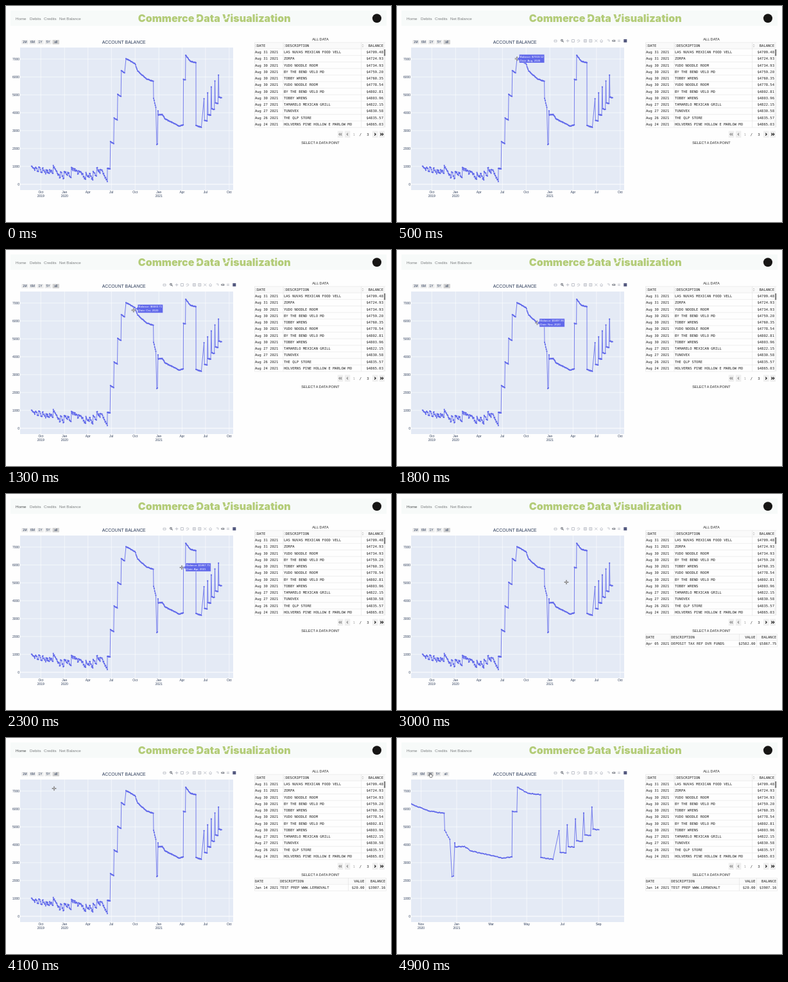
An HTML page for the animation above (5 s loop, 600x338 px).

```html
<!DOCTYPE html>
<html lang="en">
<head>
<meta charset="utf-8">
<title>Commerce Data Visualization</title>
<style>
html, body { margin: 0; width: 100%; height: 100%; overflow: hidden; background: #fefefe; }
svg { display: block; width: 100%; height: 100%; }
</style>
</head>
<body>
<svg viewBox="0 0 600 338">
  <defs><clipPath id="plot"><rect x="22" y="65" width="332" height="223"/></clipPath></defs>
  <g id="page"></g><g id="chart"></g><g id="live"></g>
</svg>
<script>
const SANS = 'Liberation Sans, Arial, sans-serif';
const MONO = 'DejaVu Sans Mono, monospace';
const INK = '#2a3a58', BLUE = '#6068ea', RULE = '#dcdcdc';
const $ = id => document.getElementById(id);

const text = (x, y, s, size, fill = '#222', anchor = 'start', font = SANS, extra = '') =>
  `<text x="${x}" y="${y}" font-size="${size}" font-family="${font}" fill="${fill}" text-anchor="${anchor}" ${extra}>${s}</text>`;
const rect = (x, y, w, h, fill, extra = '') =>
  `<rect x="${x}" y="${y}" width="${w}" height="${h}" fill="${fill}" ${extra}/>`;
const path = (d, stroke, w = 1, extra = '') =>
  `<path d="${d}" fill="none" stroke="${stroke}" stroke-width="${w}" ${extra}/>`;
const mono = (x, y, s, anchor, fill = '#222') => text(x, y, s, 5.5, fill, anchor, MONO);
const uprights = (xs, top, bottom) => path(xs.map(x => `M${x} ${top}V${bottom}`).join(''), RULE, 0.5);

// ---- axes: x in pixels of the full view, y from dollars
const NEW_YEAR = 238.2, PER_DAY = 0.4016;
const toZoom = x => 93 + (x - NEW_YEAR) * 2.266;
const dollarY = v => 279 - v * 0.028;
const day0 = Date.UTC(2021, 0, 1);
const dateX = ms => NEW_YEAR + (ms - day0) / 864e5 * PER_DAY;
const xDate = x => new Date(day0 + (x - NEW_YEAR) / PER_DAY * 864e5);
const MONTHS = 'Jan Feb Mar Apr May Jun Jul Aug Sep Oct Nov Dec'.split(' ');

// ---- balance curve: pay every two weeks, small spendings in between
const PAY = 5.65;
const rand = i => { const v = Math.sin(i * 12.9898 + 4) * 43758.5453; return v - Math.floor(v); };
const points = [];

// goes to a point; gentle slopes get a trail of small steps
function to(x, v, jitter = 40) {
  if (points.length) {
    const [px, pv] = points[points.length - 1], dx = x - px, dv = v - pv;
    const n = Math.abs(dv) < 180 * dx ? Math.round(dx / 0.8) : 0;
    for (let k = 1; k < n; k++)
      points.push([px + dx * k / n, pv + dv * k / n + (rand(points.length) - 0.5) * jitter]);
  }
  points.push([x, v]);
}

for (let i = 0; i < 21; i++) {
  const x = 39.8 + PAY * i, top = 1180 - 400 * rand(i) - 14 * i;
  to(x, top);
  to(x + PAY - 0.6, top - 180 - 180 * rand(i + 50), 170);
}
to(158, 890);
to(162.2, 860);
for (let i = 0; i < 4; i++) {
  const x = 162.8 + PAY * i, v = 2390 + 1320 * i;
  to(x, v);
  to(x + PAY - 0.6, v - 120);
}
[[187, 7019.52], [201, 6750], [205, 6340], [218.5, 5897.96], [229.6, 5760], [230, 4800], [233.5, 4300],
  [235, 2220], [236, 2250], [236.9, 4100], [237.2, 3880], [243.6, 3907.16], [248, 3650], [270, 3250],
  [276.2, 3320], [276.5, 5867.75], [279.6, 5840], [280, 7210], [287, 6880], [296, 6800], [296.1, 3290],
  [304.4, 3180]].forEach(([x, v]) => to(x, v));
for (let i = 0; i < 5; i++) {
  const x = 308.6 + PAY * i, floor = 3570 + 325 * i;
  to(x, 4780 + 330 * i);
  to(x + 0.8, floor);
  to(x + PAY - 0.9, floor - 30);
}

function chart(zoomed) {
  const place = zoomed ? toZoom : x => x;
  let s = rect(22, 65, 332, 223, '#e4eaf5');
  for (let k = 0; k < 8; k++) {
    const y = dollarY(k * 1000);
    s += path(`M22 ${y}H354`, '#fff', k ? 0.6 : 1.1) + text(21, y + 1.8, k * 1000, 5, INK, 'end');
  }
  const [start, step, count] = zoomed ? [13, 2, 6] : [0, 3, 9];
  for (let i = 0; i < count; i++) {
    const ms = Date.UTC(2019, 9 + start + i * step, 1), d = new Date(ms), x = place(dateX(ms));
    s += path(`M${x} 65V288`, '#fff', 0.6) + text(x, 293.3, MONTHS[d.getUTCMonth()], 5, INK, 'middle');
    if (!i || !d.getUTCMonth()) s += text(x, 299.2, d.getUTCFullYear(), 5, INK, 'middle');
  }
  const at = points.map(([x, v]) => `${place(x).toFixed(2)} ${dollarY(v).toFixed(2)}`);
  s += '<g clip-path="url(#plot)">' + path('M' + at.join('L'), BLUE, 0.85, 'stroke-linejoin="round"')
    + path(at.map(p => `M${p}h0`).join(''), BLUE, 2.2, 'stroke-linecap="round"') + '</g>';
  s += text(183.7, 58.7, 'ACCOUNT BALANCE', 6.9, INK, 'middle');

  ['1M', '6M', '1Y', '5Y', 'all'].forEach((label, i) => {
    const x = (zoomed ? 22.3 : 24) + i * 12.1, active = i === (zoomed ? 2 : 4);
    s += rect(x, 53, 10.6, 7, active ? '#d2d2d2' : '#eee', 'rx="1"') + text(x + 5.3, 58.2, label, 5, INK, 'middle');
  });
  return s;
}

// ---- everything that stays put
const rows = [
  ['Aug 31', 'LAS NUVAS MEXICAN FOOD VELL', '4709.48'],
  ['Aug 31', 'ZORPA', '4724.93'],
  ['Aug 30', 'YUDO NOODLE ROOM', '4734.93'],
  ['Aug 30', 'BY THE BEND VELO MO', '4759.20'],
  ['Aug 30', 'TOBBY WRENS', '4760.35'],
  ['Aug 30', 'YUDO NOODLE ROOM', '4778.54'],
  ['Aug 30', 'BY THE BEND VELO MO', '4802.81'],
  ['Aug 30', 'TOBBY WRENS', '4803.96'],
  ['Aug 27', 'TAMARELO MEXICAN GRILL', '4822.15'],
  ['Aug 27', 'TUNOVEX', '4830.58'],
  ['Aug 26', 'THE QLP STORE', '4835.57'],
  ['Aug 24', 'HOLVERNS PINE HOLLOW E MARLOW MO', '4865.03']
];

function page() {
  let s = rect(7, 7, 586, 24, '#f7faf9');
  [[37, 'Debits'], [59, 'Credits'], [83, 'Net Balance']].forEach(([x, label]) =>
    s += text(x, 21.5, label, 6.2, '#7c7f80'));
  s += text(324.7, 25.3, 'Commerce Data Visualization', 16, '#b3cc78', 'middle', 'Inter, sans-serif', 'font-weight="900"');
  s += path('M296 21L302 17M340 21L347 17', '#f7faf9', 1.5);
  s += '<circle cx="578" cy="19.3" r="7" fill="#161514"/>';

  s += text(490, 54.4, 'ALL DATA', 5.6, '#222', 'middle') + rect(387.5, 57, 204, 10, '#fafafa');
  s += mono(391, 64, 'DATE') + mono(436, 64, 'DESCRIPTION') + mono(588, 64, 'BALANCE', 'end');
  [389.5, 434.5, 556].forEach(x => s += path(`M${x - 1} 61.5l1 -1.5l1 1.5M${x - 1} 62.7l1 1.5l1 -1.5`, '#aaa', 0.6));
  rows.forEach(([date, what, sum], i) => {
    const y = 74.1 + i * 10.25;
    s += mono(388, y, date + ' 2021') + mono(433, y, what) + mono(588, y, '$' + sum, 'end')
      + path(`M387.5 ${y - 7}H589`, RULE, 0.5);
  });
  s += path('M387.5 57H591.5M387.5 190.2H589', RULE, 0.5) + uprights([387.5, 432, 553.7, 589], 57, 190)
    + rect(589, 67, 2.4, 123, '#efefef') + rect(589.2, 68, 2, 10, '#777');

  const arrow = (x, dir, color) => path(`M${x - dir} 198.9l${dir * 1.8} 1.8l${-dir * 1.8} 1.8`, color, 1.1);
  [[521, -1, 2], [532, -1, 1], [575.3, 1, 1], [585.7, 1, 2]].forEach(([x, dir, n]) => {
    s += rect(x - 4.2, 195.5, 8.5, 10.5, '#efefef');
    for (let k = 0; k < n; k++) s += arrow(x + (k - (n - 1) / 2) * 2.6, dir, dir < 0 ? '#888' : '#111');
  });
  s += mono(542.5, 202.6, '1', 'middle', '#aaa') + mono(552.5, 202.6, '/', 'middle') + mono(564, 202.6, '3', 'middle');
  return s + text(490, 216, 'SELECT A DATA POINT', 5.5, '#222', 'middle');
}

// ---- things that come and go
function picked([date, what, value, balance]) {
  const line = (y, a, b, c, d) =>
    mono(388, y, a) + mono(427.3, y, b) + mono(558.7, y, c, 'end') + mono(591.3, y, d, 'end');
  return rect(387.5, 219, 205, 10, '#fafafa') + path('M387.5 219.2h205m-205 10h205m-205 10h205', RULE, 0.5)
    + uprights([387.5, 426, 533.5, 560.5, 592.5], 219, 239)
    + line(225.9, 'DATE', 'DESCRIPTION', 'VALUE', 'BALANCE') + line(236, date, what, value, balance);
}

// toolbar icons in groups, each drawn around its own centre
const BOX = 'M-2 -2h4v4h-4z';
const icons = [
  ['M-2 -1.2h4v2.8h-4z'],
  ['M-2 -.7a1.4 1.4 0 1 0 2.8 0a1.4 1.4 0 1 0 -2.8 0M.5 .5l1.6 1.6', 'M-2.4 0h4.8M0 -2.4v4.8', BOX, 'M-2 0a2 1.5 0 1 1 2 1.5l-1.6 .8'],
  [BOX + 'M-1 0h2M0 -1v2', BOX + 'M-1 0h2', 'M-2 -2l4 4M2 -2l-4 4', 'M-2.2 .2L0 -2L2.2 .2M-1.4 0v2h2.8v-2'],
  ['M-1.5 -1.5h3v3', 'M-2 0l1 -1h3v2h-3z', 'M-2 -1h4M-2 1h4']
];
function modebar() {
  let s = rect(353.3, 52, 5, 5, '#555a80'), x = 247;
  for (const group of icons) {
    group.forEach((d, i) => {
      const strong = group.length % 2 ? i === 1 : group === icons[1] && !i;
      s += path(d, strong ? '#80848c' : '#b8bcc4', strong ? 1.2 : 0.9, `transform="translate(${x} 54.5)"`);
      x += 8.4;
    });
    x += 2.2;
  }
  return s;
}

function tip([x, value]) {
  const y = dollarY(value), d = xDate(x);
  return path(`M${x} ${y}l3.4 -2.4v-4.2h39.4v13.2h-39.4v-4.2z`, '#fff', 0.4, `style="fill:${BLUE}"`)
    + text(x + 4.8, y - 1.5, 'Balance: $' + value.toFixed(2), 4.4, '#fff')
    + text(x + 4.8, y + 4.6, `Date: ${MONTHS[d.getUTCMonth()]}, ${d.getUTCFullYear()}`, 4.4, '#fff');
}

function pointer(x, y) {
  if (y > 65) {
    const plus = `M${x - 3.3} ${y}h6.6M${x} ${y - 3.3}v6.6`;
    return path(plus, '#777', 1.9) + path(plus, '#e8e8ee', 0.5);
  }
  return path(`M${x - 1} ${y - 2.5}v3l-1.4 -.3l1.8 3.3h3.2l.8 -3.4l-3 -.8v-1.8z`, '#333', 0.6, 'style="fill:#fff"');
}

// pointer stops: arrives at, leaves at, x, y
const ENTER = 200, PICK_1 = 2600, PICK_2 = 3600, ZOOM_AT = 4700;
const stops = [[ENTER, ENTER, 262, 67], [500, 1000, 187, 82.5], [1800, 1800, 218.5, 113.9], [2300, PICK_1, 274, 115],
  [3000, 3000, 264, 138], [3400, 3700, 243.6, 169.6], [4100, 4100, 75, 79], [4500, 5000, 52, 58]];

function pointerAt(t) {
  const i = stops.findIndex(s => s[0] > t);
  if (i < 0) return stops[stops.length - 1].slice(2);
  const [, leave, x0, y0] = stops[i - 1], [arrive, , x1, y1] = stops[i];
  const u = Math.max(0, (t - leave) / (arrive - leave));
  return [x0 + (x1 - x0) * u, y0 + (y1 - y0) * u];
}

function nearest(x, y) {
  const far = p => Math.hypot(p[0] - x, dollarY(p[1]) - y);
  const best = points.reduce((a, b) => far(b) < far(a) ? b : a);
  return far(best) < 7 && best;
}

function live(t) {
  let s = text(15, 21.5, 'Home', 6.2, t >= 2200 && t < 4500 ? '#4c4f50' : '#7c7f80');
  if (t >= PICK_2) s += picked(['Jan 14 2021', 'TEST PREP WWW.LERNOVALT', '$20.00', '$3907.16']);
  else if (t >= PICK_1) s += picked(['Apr 05 2021', 'DEPOSIT TAX REF DVR FUNDS', '$2582.00', '$5867.75']);
  if (t < ENTER) return s;
  const at = pointerAt(t), hit = nearest(...at);
  return s + modebar() + pointer(...at) + (hit ? tip(hit) : '');
}

$('page').innerHTML = page();
let shownTick, shownZoom;
function frame() {
  const t = Math.floor(performance.now() % 5000 / 100) * 100, zoomed = t >= ZOOM_AT;
  if (zoomed !== shownZoom) $('chart').innerHTML = chart(shownZoom = zoomed);
  if (t !== shownTick) $('live').innerHTML = live(shownTick = t);
  requestAnimationFrame(frame);
}
frame();
</script>
</body>
</html>
```
